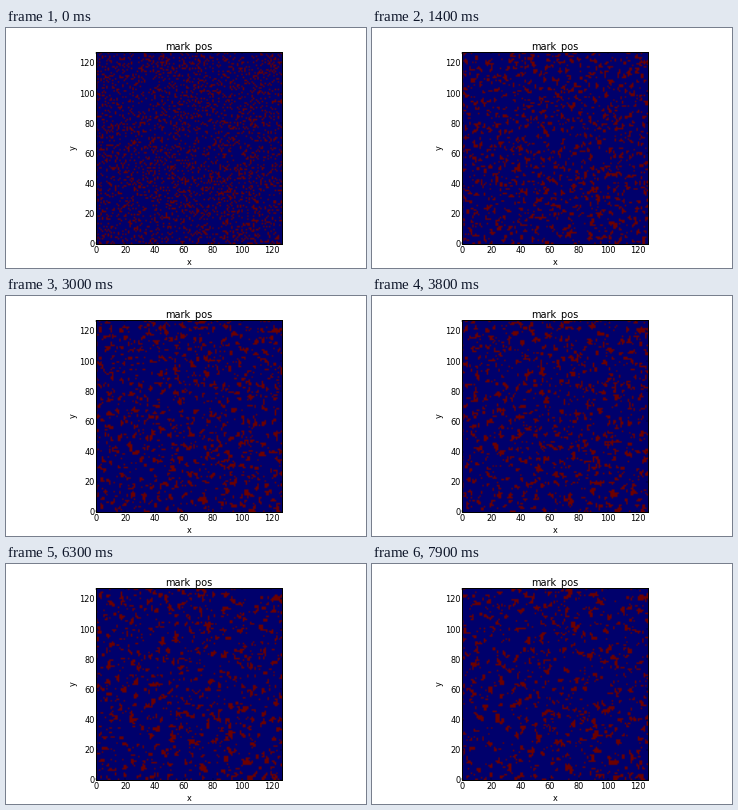
A matplotlib script that plays this animation: 360 px wide and 240 px high, repeating every 8000 ms.

```python
import matplotlib.pyplot as plt
import numpy as np
from matplotlib.animation import FuncAnimation

N, FRAMES, STEP_MS = 128, 80, 100
DENSITY = 0.19    # share of marked cells at the start
BOND = 1.85       # attraction between neighbours
ACTIVITY = 0.4    # share of pairs tried per step
FADE = 0.03       # chance that a lone cell vanishes
BLUE, RED = (0, 0, 108), (108, 0, 0)

# Centres of the longest-lived clusters
NESTS = [(78, 65), (125, 40), (15, 40), (20, 97), (74, 122), (52, 12)]

Y, X = np.mgrid[:N, :N]


def nest_field(pull=1.2, radius=5):
    return sum(pull * np.exp(-((X - x) ** 2 + (Y - y) ** 2) / radius ** 2)
               for x, y in NESTS)


def neighbours(g):
    return sum(np.roll(g, s, axis) for s in (-1, 1) for axis in (0, 1))


def swap_pairs(g, field, axis, a, b, rng):
    """Exchange neighbouring cells along one axis by the Metropolis rule."""
    along, across = (Y, X) if axis == 0 else (X, Y)
    sites = ((along + a) % 4 == 0) & ((across + b) % 2 == 0)
    diff = g - np.roll(g, -1, axis)
    worth = BOND * neighbours(g) + field
    gain = diff * (np.roll(worth, -1, axis) - worth - BOND * diff)
    accept = rng.random((N, N)) < ACTIVITY * np.exp(np.minimum(gain, 0))
    delta = np.where(sites & accept, -diff, 0)
    return g + delta - np.roll(delta, 1, axis)


def simulate(seed=12):
    rng = np.random.default_rng(seed)
    field = nest_field()
    g = (rng.random((N, N)) < DENSITY).astype(int)
    states = []
    for _ in range(FRAMES):
        states.append(g.astype(bool))
        for k in rng.permutation(16):
            g = swap_pairs(g, field, k // 8, k % 4, k // 4 % 2, rng)
        lone = (g == 1) & (neighbours(g) == 0)
        g = np.where(lone & (rng.random((N, N)) < FADE), 0, g)
    return states


def paint(state):
    return np.where(state[..., None], RED, BLUE).astype(np.uint8)


plt.rcParams.update({"font.family": "DejaVu Sans", "font.size": 5.9})
states = simulate()

fig = plt.figure(figsize=(3.6, 2.4), dpi=100, facecolor="white")
ax = fig.add_axes([90.2 / 360, 24.2 / 240, 186 / 360, 192 / 240],
                  facecolor=np.divide(BLUE, 255))
image = ax.imshow(paint(states[0]), origin="lower", extent=(0, 127.4, 0, 127.4),
                  aspect="auto", interpolation="bilinear")
ax.set_title("mark_pos", fontsize=7, pad=2.2)
ax.set_xlabel("x", labelpad=1.8)
ax.set_ylabel("y", labelpad=1.2)
ax.set_xticks(range(0, 121, 20))
ax.set_yticks(range(0, 121, 20))
ax.tick_params(direction="in", top=True, right=True, length=1.6, width=0.3)
ax.tick_params(axis="x", pad=1.6)
ax.tick_params(axis="y", pad=1.1)
for spine in ax.spines.values():
    spine.set_linewidth(0.72)


def update(i):
    image.set_data(paint(states[i]))
    return (image,)


anim = FuncAnimation(fig, update, frames=FRAMES, interval=STEP_MS,
                     repeat=True, repeat_delay=0, blit=False)
plt.show()
```
